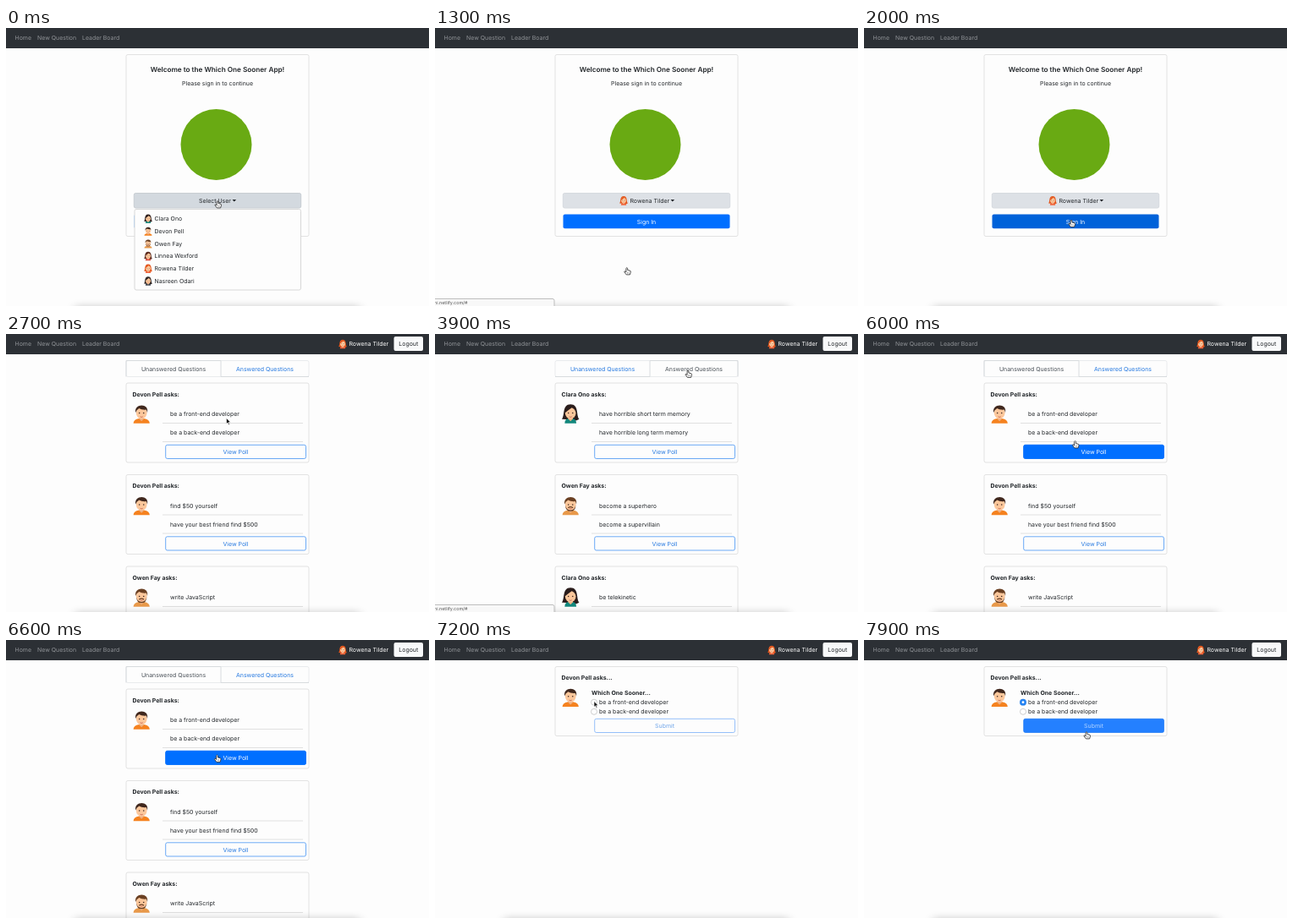
These frames come from a looping animation (500x329 px, 8000 ms). An HTML page:

```html
<!DOCTYPE html>
<html lang="en">
<head>
<meta charset="utf-8">
<title>Poll app</title>
<style>
html, body { margin: 0; width: 100%; height: 100%; overflow: hidden; background: #fdfdfd; }
svg { display: block; width: 500px; height: 329px; }
text { font: 400 6.95px Inter, "Open Sans", sans-serif; fill: #212529; text-rendering: geometricPrecision; }
.mid { text-anchor: middle; }
.bold { font-weight: 700; }
.title { font-size: 8.2px; font-weight: 600; }
.nav { fill: #919498; }
.card { fill: #fdfdfd; stroke: #e2e2e2; }
.line { stroke: #e0e0e0; }
.outline { fill: #fdfdfd; stroke: #2b86f3; stroke-width: .7; }
.link { fill: #2478e0; }
</style>
</head>
<body>
<svg id="stage" viewBox="0 0 500 329"></svg>
<script>
const LOOP = 8000, STEP = 100, BLUE = '#006fff';

const people = {
  clara: { name: 'Clara Ono', hair: '#2b1d1c', shirt: '#12877c', long: true },
  devon: { name: 'Devon Pell', hair: '#40281e', shirt: '#f5821f' },
  owen: { name: 'Owen Fay', hair: '#6a4023', shirt: '#e8994a', beard: true },
  linnea: { name: 'Linnea Wexford', hair: '#5b2c20', shirt: '#d8483c', long: true },
  rowena: { name: 'Rowena Tilder', hair: '#e2561d', shirt: '#f0643c', long: true },
  nasreen: { name: 'Nasreen Odari', hair: '#29201f', shirt: '#3c4450', long: true }
};

const text = (x, y, s, cls = '', extra = '') => `<text x="${x}" y="${y}" class="${cls}" ${extra}>${s}</text>`;
const rect = (x, y, w, h, attrs = '') => `<rect x="${x}" y="${y}" width="${w}" height="${h}" ${attrs}/>`;
const group = (id, s, attrs = '') => `<g id="${id}" ${attrs}>${s}</g>`;
const rule = (x1, x2, y) => `<path class="line" d="M${x1} ${y}H${x2}"/>`;
const caret = (x, y) => `<path d="M${x} ${y}h4.6l-2.3 2.6z" fill="#212529"/>`;

function avatar(key, x, y, scale = 1) {
  const p = people[key];
  const back = p.long
    ? `<path d="M-10.5 6.5C-6.5 2-10.5-11.5 0-11.5S6.5 2 10.5 6.5Q6 9.5 0 8T-10.5 6.5Z" fill="${p.hair}"/>` : '';
  const fringe = p.long
    ? 'M-6.8-1C-8.5-12.5 8.5-12.5 6.8-1Q5.5-6 1.5-7.5-3-4.5-6.8-1Z'
    : 'M-7-1.5C-10-12.5 9.5-14 7-1.5L5.8-5Q0-4.6-3-6.6-4.5-5-5.8-4.4Z';
  const beard = p.beard
    ? `<path d="M-6.3-.5Q-6 7 0 7T6.3-.5Q5 5.6 0 5.6T-6.3-.5Z" fill="${p.hair}"/>
       <path d="M-3 2.8Q0 .4 3 2.8" stroke="${p.hair}" stroke-width="1.2" fill="none"/>` : '';
  const wide = p.long ? 7 : 9.8;
  return `<g transform="translate(${x} ${y}) scale(${scale})">${back}
    <path d="M${-wide} 11.5Q${-wide} 6.8-3 5.5H3Q${wide} 6.8 ${wide} 11.5Z" fill="${p.shirt}"/>
    <path d="M-2.8 4h5.6v2.2L0 9-2.8 6.2z" fill="#eeb083"/>
    <ellipse cy="-1.4" rx="6.5" ry="7.4" fill="#fcc79b"/>${beard}
    <path d="${fringe}" fill="${p.hair}"/>
    <circle cx="-2.6" cy="-1" r=".8" fill="#3a2720"/><circle cx="2.6" cy="-1" r=".8" fill="#3a2720"/>
    <path d="M-1.6 3.4Q0 4.6 1.6 3.4" stroke="#c0574a" stroke-width=".8" fill="none"/></g>`;
}

function navbar() {
  return rect(0, 0, 500, 24, 'fill="#2c3035"') +
    text(10.5, 14.3, 'Home', 'nav') + text(37, 14.3, 'New Question', 'nav') +
    text(90, 14.3, 'Leader Board', 'nav') +
    group('account', avatar('rowena', 398, 12, .46) +
      text(405.5, 14.3, people.rowena.name, '', 'style="fill:#fff"') +
      rect(458.5, 3, 34.5, 17, 'rx="2" fill="#f8f9fa"') + text(475.8, 14.2, 'Logout', 'mid'));
}

function login() {
  const menu = Object.keys(people).map((key, i) => {
    const y = 225.5 + i * 14.75;
    return avatar(key, 168, y + .3, .46) + text(175.5, y + 2.5, people[key].name);
  }).join('');
  return rect(142, 31.5, 216, 215, 'class="card" rx="2"') +
    text(250, 52.3, 'Welcome to the Which One Sooner App!', 'mid title') +
    text(250, 68.4, 'Please sign in to continue', 'mid') +
    '<circle cx="248.5" cy="138" r="42" fill="#69aa13"/>' +
    rect(151.3, 195.5, 197.4, 17.5, 'id="select" rx="2"') +
    group('prompt', text(228, 207, 'Select User') + caret(267.5, 203)) +
    group('chosen', avatar('rowena', 223, 204.4, .46) + text(230.5, 207, people.rowena.name) + caret(278.5, 203)) +
    rect(151.5, 220.5, 197, 16.8, 'id="signIn" rx="2"') +
    text(250, 231.6, 'Sign In', 'mid', 'style="fill:#fff"') +
    group('menu', rect(152, 214.5, 196.5, 95.5, 'rx="2" fill="#fdfdfd" stroke="#d8d8d8"') + menu);
}

function card(i, key, options) {
  const y = i * 108.5;
  const [first, second] = options;
  return `<g transform="translate(0 ${y})">` +
    rect(142, 58, 216, 94, 'class="card" rx="2"') +
    text(149.5, 73.7, people[key].name + ' asks:', 'bold') + avatar(key, 160.2, 94.5, .98) +
    text(194, 97, first) + rule(185, 351, 105.5) + text(194, 119.2, second) + rule(185, 351, 127.5) +
    rect(188.7, 131.3, 165.8, 16.2, 'class="outline" rx="2"') + text(271.5, 142, 'View Poll', 'mid link') + '</g>';
}

const unanswered = [
  ['devon', ['be a front-end developer', 'be a back-end developer']],
  ['devon', ['find $50 yourself', 'have your best friend find $500']],
  ['owen', ['write JavaScript', '']]
];
const answered = [
  ['clara', ['have horrible short term memory', 'have horrible long term memory']],
  ['owen', ['become a superhero', 'become a supervillain']],
  ['clara', ['be telekinetic', '']]
];
const cards = list => list.map(([key, options], i) => card(i, key, options)).join('');

function tabs() {
  return rect(142, 31.5, 216, 19, 'fill="#fdfdfd" stroke="#e9ebed" rx="2"') +
    '<path id="tabEdge" fill="none" stroke="#d8dbde"/>' +
    text(198, 43.8, 'Unanswered Questions', 'mid', 'id="tabA"') +
    text(306, 43.8, 'Answered Questions', 'mid', 'id="tabB"');
}

function poll() {
  return rect(142, 31.5, 216, 82, 'class="card" rx="2"') +
    text(149.5, 47, people.devon.name + ' asks...', 'bold') + avatar('devon', 160.2, 67.8, .98) +
    text(185, 65.2, 'Which One Sooner...', 'bold') +
    '<circle cx="188" cy="73.7" r="3.5" fill="#fff" stroke="#b9b9b9" stroke-width=".7"/>' +
    '<circle cx="188" cy="84.8" r="3.5" fill="#fff" stroke="#b9b9b9" stroke-width=".7"/>' +
    group('picked', '<circle cx="188" cy="73.7" r="3.9" fill="#2583f2"/><circle cx="188" cy="73.7" r="1.4" fill="#fff"/>') +
    text(194, 76, 'be a front-end developer') + text(194, 87.1, 'be a back-end developer') +
    group('submit', rect(188.7, 93.3, 165.8, 16.2, 'id="submitBox" rx="2" stroke="#1a78f5" stroke-width=".7"') +
      text(271.5, 104, 'Submit', 'mid', 'id="submitText"'));
}

const stage = document.getElementById('stage');
stage.innerHTML =
  '<defs><filter id="soft" x="-20%" y="-200%" width="140%" height="500%"><feGaussianBlur stdDeviation="6 4"/></filter></defs>' +
  rect(0, 0, 500, 329, 'fill="#fdfdfd"') + navbar() + group('login', login()) +
  group('list', tabs() + group('unanswered', cards(unanswered) +
    group('viewHover', rect(188.7, 131.3, 165.8, 16.2, `rx="2" fill="${BLUE}" stroke="${BLUE}" stroke-width=".7"`) +
      text(271.5, 142, 'View Poll', 'mid', 'style="fill:#fff"'))) +
    group('answered', cards(answered))) +
  group('poll', poll()) +
  rect(82, 329, 336, 10, 'fill="#000" opacity=".2" filter="url(#soft)"') +
  group('status', rect(-2, 320.5, 143, 12, 'rx="2" fill="#f8f8f8" stroke="#bdbdbd"') +
    text(-1, 327, 'ni.netlify.com/#', '', 'style="font-size:5.4px;fill:#555"')) +
  group('arrow', '<path d="M0 0V6.8L1.6 5.4 2.7 7.9 3.8 7.4 2.7 5H4.9Z" fill="#111" stroke="#fff" stroke-width=".6"/>') +
  group('hand', '<path d="M-.9 .9Q0-.7.9.9V3L4 3.8Q4.7 4.2 4.4 5.8L3.6 8.4H-.6L-3 5.2Q-3 4-1.9 4.5L-.9 5.4Z" fill="#fff" stroke="#222" stroke-width=".8" stroke-linejoin="round"/><path d="M.7 5.2v2M2.2 5.2v2" stroke="#555" stroke-width=".5"/>');

const el = id => document.getElementById(id);
const show = (id, on) => { el(id).style.display = on ? '' : 'none'; };
const within = (t, a, b) => t >= a && t < b;

// time, x, y of the pointer tip
const path = [
  [0, 250, 204.5], [200, 249, 209], [800, 228, 281], [1000, 226.8, 283.5], [1400, 226.8, 283.5],
  [1800, 245, 227], [2200, 245, 227], [2600, 260.5, 102], [2700, 260.5, 99.5], [2900, 263, 95],
  [3400, 299, 43], [4200, 299, 43], [4700, 220, 44], [5300, 219.5, 44], [5600, 224, 56],
  [6000, 249.5, 126.5], [6300, 249.5, 136], [6900, 249.5, 136], [7200, 188, 72.5], [7400, 188.5, 73],
  [7600, 226, 112], [7800, 259, 114], [7900, 263, 108.5]
];
const hands = [[0, 1500], [1700, 2300], [3300, 4300], [4500, 5500], [6000, 6800], [7900, LOOP]];

function pointer(t) {
  const i = path.findIndex(p => p[0] >= t);
  if (i < 1) return path[i < 0 ? path.length - 1 : 0].slice(1);
  const [t0, x0, y0] = path[i - 1], [t1, x1, y1] = path[i];
  const k = (t - t0) / (t1 - t0), e = k * k * (3 - 2 * k);
  return [x0 + (x1 - x0) * e, y0 + (y1 - y0) * e];
}

function draw(t) {
  const page = t < 2200 ? 'login' : t < 6800 ? 'list' : 'poll';
  for (const id of ['login', 'list', 'poll']) show(id, id === page);
  show('account', page !== 'login');

  const open = t < 1100;
  show('menu', open);
  show('prompt', open);
  show('chosen', !open);
  el('select').setAttribute('fill', open ? '#d3d9df' : '#dde1e6');
  el('select').setAttribute('stroke', open ? '#c8cdd2' : '#d6dadf');
  el('signIn').setAttribute('fill', open ? '#59a8ff' : t < 1700 ? BLUE : '#0062d9');

  const right = within(t, 3900, 5100);
  show('answered', right);
  show('unanswered', !right);
  show('viewHover', within(t, 5900, 6800));
  el('tabEdge').setAttribute('d', right ? 'M142 50.5H254V31.5H358V50.5' : 'M142 50.5V31.5H254V50.5H358');
  const dark = '#495057', blue = '#2478e0', hover = '#0f55b5';
  el('tabA').style.fill = !right ? dark : t >= 4500 ? hover : blue;
  el('tabB').style.fill = right ? dark : within(t, 3300, 3900) ? hover : blue;

  show('picked', t >= 7400);
  const hot = t >= 7900;
  el('submit').setAttribute('opacity', t >= 7400 ? 1 : .65);
  el('submitBox').setAttribute('fill', hot ? '#2480ff' : '#fdfdfd');
  el('submitText').style.fill = hot ? '#b4d5ff' : blue;

  show('status', within(t, 1000, 2000) || within(t, 3900, 5700));
  const [x, y] = pointer(t), hand = hands.some(([a, b]) => within(t, a, b));
  show('hand', hand);
  show('arrow', !hand);
  el(hand ? 'hand' : 'arrow').setAttribute('transform', `translate(${x} ${y})`);
}

const start = performance.now();
function tick(now) {
  const t = Math.max(0, now - start) % LOOP;
  draw(Math.floor(t / STEP) * STEP);
  requestAnimationFrame(tick);
}
draw(0);
requestAnimationFrame(tick);
</script>
</body>
</html>
```
